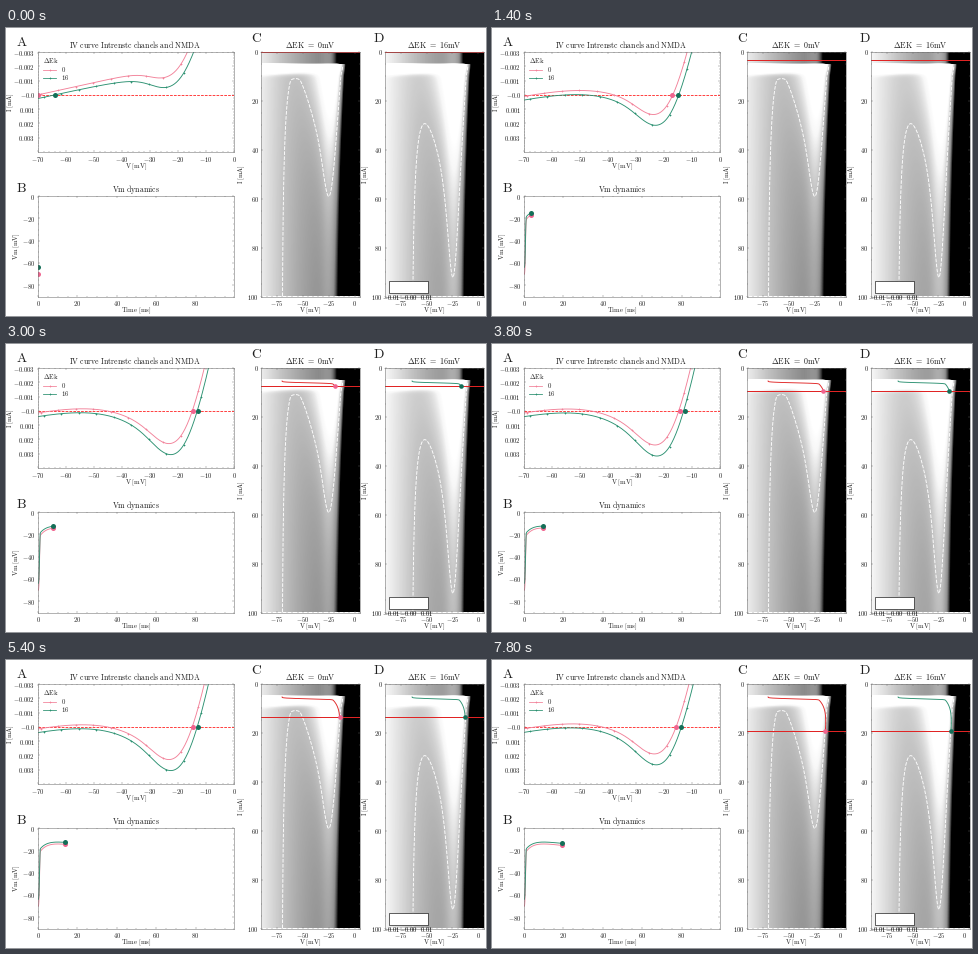
Recreate the animation shown at these times as a matplotlib script. Size 480 by 288 pixels, loop 8 s.

```python
import numpy as np
import matplotlib.pyplot as plt
from matplotlib.animation import FuncAnimation
from matplotlib.colors import LinearSegmentedColormap
from matplotlib.ticker import AutoMinorLocator

W, H = 480, 288
FRAMES, STEP = 40, 200
DT = 0.5              # simulated ms per frame
ONSET = 5             # synaptic onset in the maps, ms
UNIT = 14.35          # current scale: model units per 0.001 mA

PINK, GREEN, RED = "#f28199", "#2a9070", "#e02424"
DOTS = ("#f0648f", "#146f58")
INK, FRAME = "#202020", "#686868"
REST = (-70, -64)

plt.rcParams["mathtext.fontset"] = "cm"
fig = plt.figure(figsize=(W / 72, H / 72), dpi=72, facecolor="white")


def rm(text):
    """Upright Computer Modern text."""
    text = text.replace(" ", r"\ ").replace("Δ", r"\Delta ").replace("=", "{=}")
    return rf"$\mathrm{{{text}}}$"


def num(value):
    return rm(str(value).replace("-", "{-}"))


# ---- model -------------------------------------------------------------

def logistic(v, mid, width):
    return 1 / (1 + np.exp(-(v - mid) / width))


def intrinsic(v, shifted):
    i = -0.62 * (v + 70) + 17 * logistic(v, -29, 3.2)
    i = i - 27 * np.log1p(np.exp((v + 18.2) / 3))
    if shifted:
        i = i + 3.6 + 19 * logistic(v, -19, 9)
    return i


def nmda(v):
    return -0.145 * v * logistic(v, -15, 10)


def drive(t):
    return 74 * (np.exp(-t / 40) - np.exp(-t / 3.9))


def voltage(t, k):
    t = np.maximum(t, 0)
    top, gain = ((-14.2, 0.19), (-12.5, 0.17))[k]
    target = top - gain * (52.5 - drive(t))
    return REST[k] + (target - REST[k]) * (1 - np.exp(-(t / 0.8) ** 4))


def current_map(v, t, k):
    u = np.maximum(t - ONSET, 0)
    fast = 45 * np.exp(-(u / 3.5) ** 3) * -v / 40
    syn = 74 * np.exp(-u / 38) * nmda(v) + fast
    return intrinsic(v, k) + np.where(t > ONSET, syn, 0)


# ---- layout ------------------------------------------------------------

def panel(x0, y0, x1, y1, xlim, ylim, pad):
    ax = fig.add_axes([x0 / W, 1 - y1 / H, (x1 - x0) / W, (y1 - y0) / H])
    ax.set_xlim(*xlim)
    ax.set_ylim(*ylim)
    ax.xaxis.set_minor_locator(AutoMinorLocator())
    ax.yaxis.set_minor_locator(AutoMinorLocator())
    ax.tick_params(which="both", direction="in", top=True, right=True,
                   width=0.4, color=FRAME, labelcolor=INK, labelsize=6.6)
    ax.tick_params(which="major", length=2.2)
    ax.tick_params(which="minor", length=1.1)
    ax.tick_params(axis="x", pad=pad[0])
    ax.tick_params(axis="y", pad=pad[1])
    for side in ax.spines.values():
        side.set(linewidth=0.5, color=FRAME)
    return ax


def ticks(ax, xs, ys, ylabels=None):
    ax.set_xticks(xs, [num(x) for x in xs])
    ax.set_yticks(ys, [num(y) for y in ylabels or ys])


def label(x, y, text, size=6.7, **kw):
    opts = dict(ha="center", va="baseline", color=INK, fontsize=size)
    opts.update(kw)
    fig.text(x / W, 1 - y / H, text, **opts)


def upright(x, y, text):
    label(x, y, rm(text), rotation=90, va="center")


iv = panel(32, 24, 228, 124, (-70, 0), (4, -3), (2.5, 3))
iv_y = (-3, -2, -1, 0, 1, 2, 3)
ticks(iv, range(-70, 1, 10), iv_y,
      ["-0.0" if y == 0 else f"{y / 1000:.3f}" for y in iv_y])
vm = panel(32, 168, 228, 268.5, (0, 99.5), (-90, 0), (2.2, 3))
ticks(vm, range(0, 81, 20), range(0, -81, -20))
maps = [panel(x, 23.5, x + 98.3, 268.5, (-90, 5), (100, 0), (2, 2.5))
        for x in (255.4, 379.2)]
for ax in maps:
    ticks(ax, range(-75, 1, 25), range(0, 101, 20))

for x, y, letter in ((15.5, 18, "A"), (15.5, 164, "B"),
                     (250, 14, "C"), (373, 14, "D")):
    label(x, y, rm(letter), 13.5)
label(129, 20, rm("IV curve Intrenstc chanels and NMDA"), 7.75)
label(130, 163.5, rm("Vm dynamics"), 7.75)
label(304, 19.5, rm("ΔEK = 0mV"), 8)
label(428, 19.5, rm("ΔEK = 16mV"), 8)
label(130, 140, rm("V [mV]"))
label(130, 284, rm("Time [ms]"))
label(304, 284, rm("V [mV]"))
label(428, 284, rm("V [mV]"))
upright(5, 74, "I [mA]")
upright(11, 218, "Vm [mV]")
upright(236.2, 146, "I [mA]")
upright(359.5, 146, "I [mA]")

# overlay in stage pixels for the legend and the colour key
stage = fig.add_axes([0, 0, 1, 1], zorder=5)
stage.set(xlim=(0, W), ylim=(H, 0))
stage.axis("off")
label(45, 35, rm("ΔEk"), 6.7)
for y, text, color in ((41.5, "0", PINK), (50, "16", GREEN)):
    stage.plot([37, 50], [y, y], color=color, lw=0.8)
    stage.plot(43.5, y, "+", color=color, ms=2.6, mew=0.7)
    label(55, y + 2.2, rm(text), 6.7, ha="left")
stage.add_patch(plt.Rectangle((382.5, 253), 39.5, 12, fc="white",
                              ec="black", lw=0.6))
for x, text in ((385.5, "-0.01"), (402, "-0.00"), (421, "0.01")):
    label(x, 272, rf"$\mathbf{{{text.replace('-', '{-}')}}}$", 6.5,
          color="black")

# ---- current maps ------------------------------------------------------

LOW, HIGH = -40, 24
stops = ((LOW, 0), (-28, 0.33), (-19, 0.56), (-8, 0.67), (0, 0.76),
         (8, 0.87), (16, 0.97), (HIGH, 1))
cmap = LinearSegmentedColormap.from_list(
    "current", [((v - LOW) / (HIGH - LOW), (g, g, g)) for v, g in stops])
grid_v, grid_t = np.meshgrid(np.linspace(-90, 5, 191),
                             np.linspace(0, 100, 401))
for k, ax in enumerate(maps):
    amps = current_map(grid_v, grid_t, k)
    ax.imshow(amps, cmap=cmap, vmin=LOW, vmax=HIGH, aspect="auto",
              extent=(-90, 5, 100, 0), interpolation="bilinear")
    late = grid_t[:, 0] > ONSET + 1
    ax.contour(grid_v[late], grid_t[late], amps[late], [0], colors="white",
               linewidths=0.9, linestyles=[(0, (4, 1.6))])

# ---- moving parts ------------------------------------------------------

volts = np.linspace(-70, 0, 281)
iv.axhline(0, color="#ff3030", lw=0.9, dashes=(3, 1.3), zorder=2)
curves, traces, paths, iv_dots, vm_dots, map_dots, cursors = ([] for _ in range(7))
for k, color in enumerate((PINK, GREEN)):
    def dot(ax, size=5):
        return ax.plot([], [], "o", color=DOTS[k], ms=size, mew=0,
                       zorder=2.4)[0]

    curves.append(iv.plot([], [], color=color, lw=0.9, marker="+", ms=2.8,
                          mew=0.7, markevery=(4 + 4 * k, 25))[0])
    traces.append(vm.plot([], [], color=color, lw=0.9)[0])
    paths.append(maps[k].plot([], [], color=(RED, GREEN)[k], lw=0.9)[0])
    cursors.append(maps[k].axhline(0, color=RED, lw=1, zorder=2.2))
    iv_dots.append(dot(iv))
    vm_dots.append(dot(vm))
    map_dots.append(dot(maps[k], 4.6))


def update(i):
    t = i * DT
    past = np.linspace(0, t, 10 * i + 1)
    lag = ONSET + DT
    seen = past[past >= lag - 1e-9]
    for k in range(2):
        now = voltage(t, k)
        amps = intrinsic(volts, k) + drive(t) * nmda(volts)
        curves[k].set_data(volts, amps / UNIT)
        iv_dots[k].set_data([now], [0])
        traces[k].set_data(past, voltage(past, k))
        vm_dots[k].set_data([t], [now])
        cursors[k].set_ydata([t, t])
        path = voltage(seen - lag, k)
        paths[k].set_data(path, seen)
        map_dots[k].set_data(path[-1:], seen[-1:])
    return curves + traces + paths + cursors + iv_dots + vm_dots + map_dots


anim = FuncAnimation(fig, update, frames=FRAMES, interval=STEP,
                     init_func=lambda: update(0), repeat=True,
                     repeat_delay=0, blit=False)
plt.show()
```
